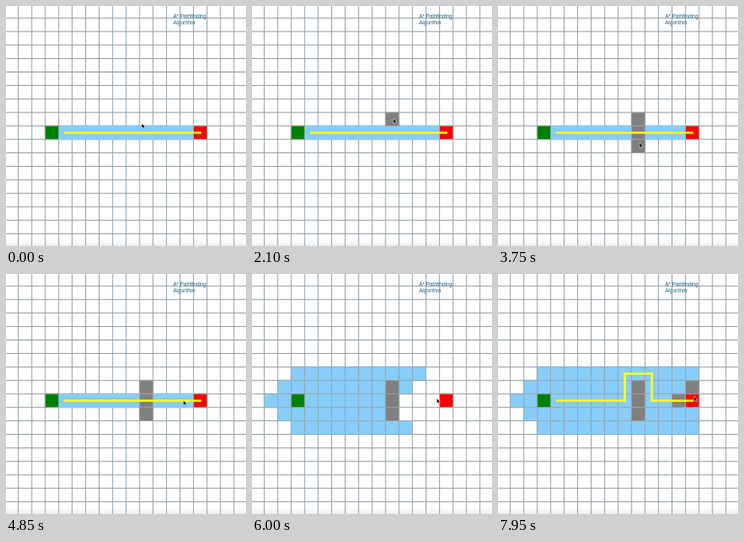
These frames come from a looping animation (300 by 300 pixels, 8 s). An HTML page:

```html
<!DOCTYPE html>
<html lang="en">
<head>
<meta charset="utf-8">
<title>A* Pathfinding</title>
<style>
  html, body { margin: 0; width: 100%; height: 100%; overflow: hidden; background: #fff; }
  svg { display: block; width: 100vw; height: 100vh; }
  text { font: 6.5px "Liberation Sans", Arial, sans-serif; fill: #1d5f8a; }
</style>
</head>
<body>
<svg viewBox="0 0 300 300">
  <defs>
    <linearGradient id="shade" x1="0" y1="0" x2="0" y2="1">
      <stop offset="0" stop-color="#fff" stop-opacity="0"/>
      <stop offset="1" stop-color="#e9eaec"/>
    </linearGradient>
  </defs>
  <rect width="300" height="300" fill="#fff"/>
  <rect y="290" width="300" height="10" fill="url(#shade)"/>
  <g id="grid"></g>
  <g id="cells"></g>
  <path id="route" fill="none" stroke="#ffff1c" stroke-width="2.8" stroke-linecap="square"/>
  <text x="209" y="15">A* Pathfinding</text>
  <text x="209" y="22.6">Algorithm</text>
  <path id="cursor" d="M0 0V6L1.4 4.8L2.5 7.2L3.6 6.7L2.6 4.4H4.4Z" fill="#000" stroke="#fff" stroke-width=".5"/>
</svg>
<script>
const NS = 'http://www.w3.org/2000/svg';
const LOOP = 8000, SIZE = 16.85, X0 = 49, Y0 = 149.9, GOAL = 11;
const BLUE = '#87cdf9', GRAY = '#808080';
const CLEAR = 5400, SEARCH = 5600, STEP = 9;
const $ = id => document.getElementById(id);

function add(parent, tag, attrs) {
  const el = document.createElementNS(NS, tag);
  for (const k in attrs) el.setAttribute(k, attrs[k]);
  return parent.appendChild(el);
}

const px = c => X0 + c * SIZE;
const py = r => Y0 + r * SIZE;

for (let i = -9; i < 16; i++) {
  add($('grid'), 'path', { d: `M0 ${py(i)}H300`, stroke: '#8d9398' });
  add($('grid'), 'path', { d: `M${px(i)} 0V300`, stroke: '#8b9ba6' });
}

// Each cell is visible from time `on` until time `off`.
const cells = [];
function cell(c, r, fill, on = 0, off = LOOP, edge = '#9aa5ab') {
  const el = add($('cells'), 'rect', {
    x: px(c), y: py(r), width: SIZE, height: SIZE, fill, stroke: edge, 'stroke-width': .9
  });
  cells.push({ el, on, off });
}
const wall = (c, r, on) => cell(c, r, GRAY, on, LOOP, '#a2a2a2');

// First, straight route
for (let c = 1; c < GOAL; c++) cell(c, 0, BLUE, 0, CLEAR, BLUE);

// Cells visited by the search, ordered by total cost; beyond the wall by depth
function cost([c, r]) {
  const a = Math.abs(r);
  return c < 7
    ? Math.abs(c) + GOAL - c + 2 * a + c * .01
    : GOAL + c - a + r * .01;
}
const visited = [];
for (let r = -2; r <= 2; r++) {
  for (let c = Math.abs(r) - 2; c <= GOAL; c++) {
    const blocked = c === 7 && Math.abs(r) < 2;
    const end = r === 0 && (c === 0 || c === GOAL);
    if (!blocked && !end) visited.push([c, r]);
  }
}
visited.sort((a, b) => cost(a) - cost(b));
visited.forEach(([c, r], i) => cell(c, r, BLUE, SEARCH + (i + 1) * STEP));
const FOUND = SEARCH + (visited.length + 5) * STEP;

// Walls drawn by the pointer
wall(7, -1, 1700);
wall(7, 0, 2800);
wall(7, 1, 3100);
wall(10, 0, 7000);
wall(11, -1, 7400);

cell(0, 0, '#008000');
cell(GOAL, 0, '#ff0000');

const lane = py(.5);
const from = `M${px(1.5)} ${lane}`, to = `H${px(GOAL + .5)}`;
const straight = from + to;
const detour = `${from}H${px(6.5)}V${py(-1.5)}H${px(8.5)}V${lane}${to}`;

// Eased progress from time a to time b
function ease(t, a, b) {
  const u = Math.min(1, Math.max(0, (t - a) / (b - a)));
  return u * u * (3 - 2 * u);
}

function pointer(t) {
  const aim = ease(t, 100, 850);
  const drag = ease(t, 2600, 3250);
  const leave = ease(t, 4150, 5100);
  const finish = ease(t, 6850, 7700);
  const x = 169.7 + 7 * aim + 54.3 * leave + 14 * finish;
  const y = 146.8 - 6 * aim + 30.2 * drag - 15.5 * leave - 2.5 * finish;
  return `translate(${x} ${y})`;
}

function draw(t) {
  for (const { el, on, off } of cells) {
    el.style.display = t >= on && t < off ? '' : 'none';
  }
  $('route').setAttribute('d', t < CLEAR ? straight : t >= FOUND ? detour : '');
  $('cursor').setAttribute('transform', pointer(t));
}

const begin = performance.now();
function tick() {
  draw((performance.now() - begin) % LOOP);
  requestAnimationFrame(tick);
}
tick();
</script>
</body>
</html>
```
